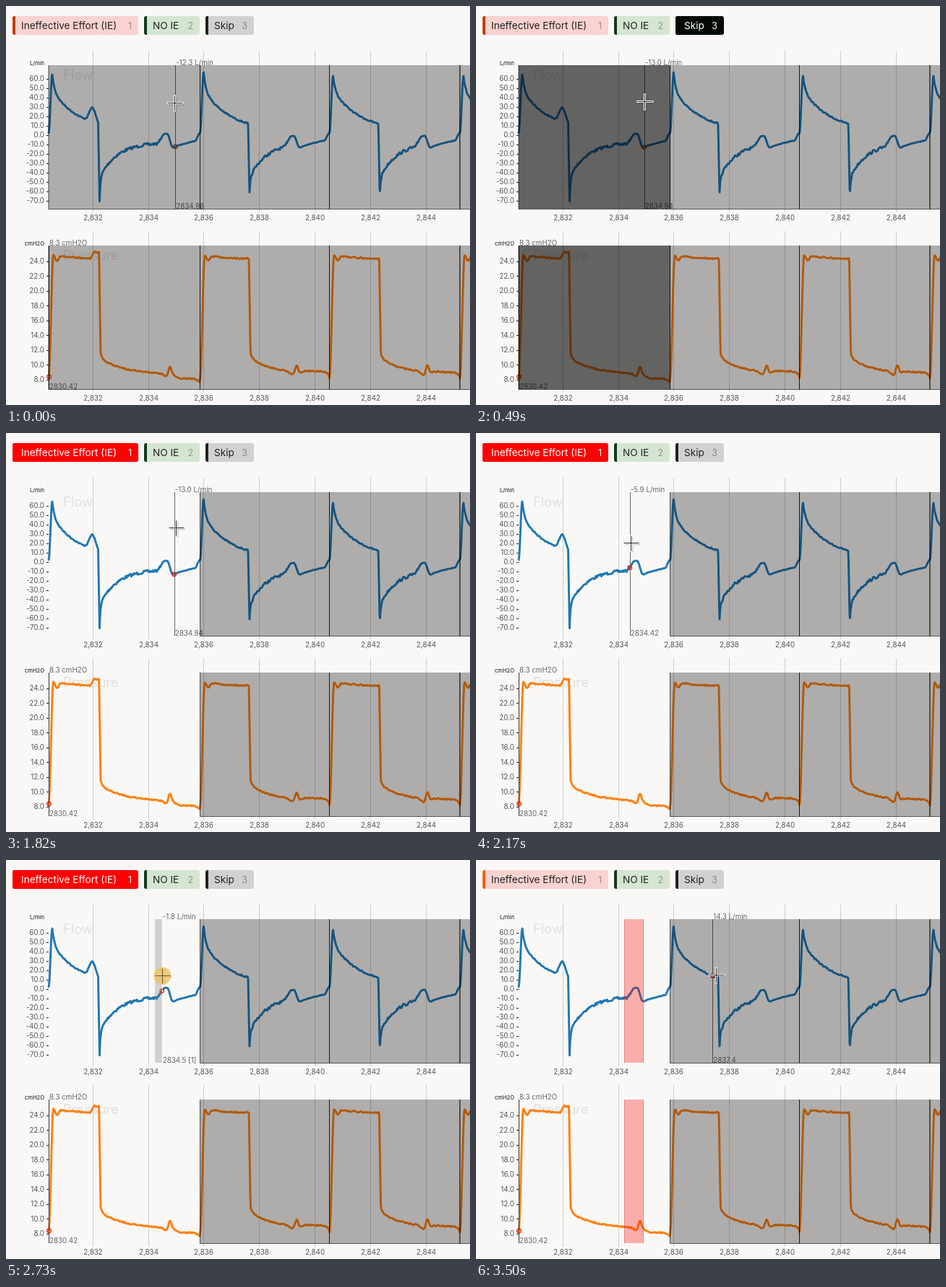
Recreate the animation shown at these times as an HTML page. Size 642 by 553 pixels, loop 3.57 s.

```html
<!DOCTYPE html>
<html lang="en">
<head>
<meta charset="utf-8">
<title>Waveform annotation</title>
<style>
  html, body { margin: 0; width: 100%; height: 100%; overflow: hidden; background: #f9f8f6; }
  svg { display: block; width: 642px; height: 553px; }
  text { font-family: Inter, "Open Sans", sans-serif; font-size: 9.8px; fill: #555; white-space: pre; }
  .title { font-size: 18.4px; fill: #e1e0df; }
  .unit { font-size: 7.6px; fill: #111; }
  .readout { fill: #666; }
  .name { font-size: 13.6px; fill: #222; }
  .key { font-size: 12.5px; fill: #222; fill-opacity: .4; }
  .pressed text { fill: #fff; fill-opacity: 1; }
  .wave { fill: none; stroke-width: 2.9; stroke-linejoin: round; stroke-linecap: round; }
</style>
</head>
<body>
<svg id="stage" viewBox="0 0 642 553"></svg>
<script>
const LOOP = 3570, STEP = 70, WIDTH = 642;
const stage = document.getElementById('stage');
const plots = [{ top: 82, bottom: 281 }, { top: 332, bottom: 531 }];
const timeToX = s => 59 + (s - 2830.42) * 38.43;

const mix = (a, b, p) => a + (b - a) * p;
const clamp = p => Math.min(1, Math.max(0, p));
const ease = p => p * p * (3 - 2 * p);
const smooth = (from, to, x) => ease(clamp((x - from) / (to - from)));
const decay = (d, length) => Math.exp(-d / length);
const bell = (d, width) => Math.exp(-d * d / (2 * width * width));

function set(el, attrs) {
  for (const k in attrs) el.setAttribute(k, attrs[k]);
}
function add(parent, tag, attrs, text) {
  const el = document.createElementNS('http://www.w3.org/2000/svg', tag);
  set(el, attrs);
  if (text !== undefined) el.textContent = text;
  return parent.appendChild(el);
}
const show = (el, on) => el.style.display = on ? '' : 'none';
const group = () => add(stage, 'g', {});
const label = (x, y, cls, text, anchor = 'start', parent = stage) =>
  add(parent, 'text', { x, y, class: cls, 'text-anchor': anchor }, text);
const line = (d, stroke, width = 1, parent = stage) =>
  add(parent, 'path', { d, stroke, 'stroke-width': width, fill: 'none' });

// Breaths: x of the start, the switch to exhaling, the late effort and the end;
// flow extremes; late pressure drift; strength of a push before exhaling.
const breath = (start, drop, effort, end, peak, trough, sag, push) =>
  ({ start, drop, effort, end, peak, trough, sag, push });
const breaths = [
  breath(59, 127.5, 226.8, 268.5, 95, 271, 6, 20),
  breath(268.5, 334.9, 402, 447.5, 92, 262, -3, 0),
  breath(447.5, 515.2, 583, 628, 97, 263, -2, 0),
  breath(628, 696, 764, 808, 97, 263, -2, 0)
];
const breathAt = x => breaths.find(b => x < b.end);

function inhaleFlow(b, x) {
  const d = x - b.start - 5;
  return 174.2 - 57.3 * decay(d, 38) - (116.9 - b.peak) * decay(d, 3)
    - b.push * bell(x - b.drop + 8, 4.2);
}
function exhaleFlow(b, x) {
  const d = x - b.drop - 2, e = x - b.effort;
  const early = 189 + 49 * decay(d, 24) + (b.trough - 238) * decay(d, 1.2) - 13 * smooth(-18, -7, e);
  const late = 195.87 - .7 * Math.max(0, e - 6) ** .75;
  return mix(mix(early, late, smooth(-4, 4, e)), 176, smooth(b.end - 7, b.end, x));
}
function flowY(x) {
  const b = breathAt(x);
  if (x < b.start + 5) return mix(176, b.peak, smooth(b.start, b.start + 5, x));
  if (x < b.drop) return inhaleFlow(b, x);
  if (x < b.drop + 2) return mix(inhaleFlow(b, b.drop), b.trough, (x - b.drop) / 2);
  return exhaleFlow(b, x);
}

function pressureY(x) {
  const b = breathAt(x), d = x - b.start, fall = b.drop + 1.2;
  const held = 344.5 + 7 * (1 - decay(d, 40)) + 7 * bell(d - 11.5, 2)
    - .45 * b.push * smooth(fall - 13, fall - 6, x);
  if (x < fall) return mix(516, held, smooth(0, 6.5, d));
  const out = Math.max(0, x - fall - 2), e = x - b.effort;
  const released = 511 - 22 * decay(out, 35) - 8 * decay(out, 3) + 4 * bell(e + 5, 4)
    - 11 * bell(e, 2) + b.sag * smooth(2, 14, e) + 4 * smooth(b.end - 8, b.end, x);
  return mix(held, released, clamp((x - fall) / 2.2));
}

function wavePath(curve, roughness, seed) {
  const random = () => (seed = seed * 16807 % 2147483647) / 2147483647 - .5;
  const grain = Array.from({ length: WIDTH }, random);
  let d = '';
  for (let x = 59; x <= WIDTH + 2; x += .5) {
    const g = (x - 59) / 1.3, i = Math.floor(g);
    const y = curve(x) + mix(grain[i], grain[i + 1], g - i) * roughness(x);
    d += `${d ? 'L' : 'M'}${x},${y.toFixed(1)}`;
  }
  return d;
}
function flowRoughness(x) {
  const b = breathAt(x);
  if (x < b.start + 8 || x > b.effort - 14) return .6;
  return x < b.drop ? 2 : 4.2;
}

// Grid, axes and titles
for (let s = 2832; s < 2846; s += 2) {
  const x = Math.round(timeToX(s)) + .5;
  line(`M${x},62V286M${x},312V536`, '#cecdcc');
  const text = s.toLocaleString('en-US');
  label(x, 296.5, '', text, 'middle');
  label(x, 546.5, '', text, 'middle');
}
function axis(from, to, step, toY) {
  for (let v = from; v <= to; v += step) {
    const y = toY(v);
    label(53, y + 3.5, '', v.toFixed(1), 'end');
    line(`M56,${Math.round(y) + .5}h3`, '#222');
  }
}
axis(-70, 60, 10, v => 178.9 - v * 1.3);
axis(8, 24, 2, v => 517.8 - (v - 8) * 10.25);
label(53, 82, 'unit', 'L/min', 'end');
label(53, 332, 'unit', 'cmH2O', 'end');
label(79, 102, 'title', 'Flow');
label(79, 352, 'title', 'Pressure');

add(stage, 'path', { class: 'wave', stroke: '#1f77b4', d: wavePath(flowY, flowRoughness, 7) });
add(stage, 'path', { class: 'wave', stroke: '#ff7f0e', d: wavePath(pressureY, () => 1.8, 23) });

// Readouts
const hairline = line('', '#666');
const flowValue = label(0, 82, 'readout', '');
const flowTime = label(0, 281, 'readout', '');
line('M59.5,332V531', '#333');
label(60, 332, 'readout', '8.3 cmH2O');
label(60, 531, 'readout', '2830.42');
const ring = cy => add(stage, 'circle', { cx: 59.5, cy, r: 2.8, fill: 'none', 'stroke-width': 1.2 });
const flowRing = ring(195), pressureRing = ring(514);

// Overlays
function block(parent, x0, x1, plot, fill, opacity) {
  return add(parent, 'rect', { x: x0, y: plot.top, width: x1 - x0, height: plot.bottom - plot.top,
    fill, 'fill-opacity': opacity });
}
const shades = breaths.map(({ start, end }) => {
  const g = group();
  plots.forEach(p => {
    block(g, start, end, p, '#000', .3);
    line(`M${start},${p.top}V${p.bottom + .5}H${end}V${p.top}`, 'rgba(0,0,0,.65)', 1, g);
  });
  return g;
});
const dark = group();
plots.forEach(p => block(dark, 59, 268.5, p, '#000', .43));
const selection = block(stage, 206, 206, plots[0], '#808080', .33);
const annotation = group();
plots.forEach(p => {
  block(annotation, 205.5, 231.5, p, '#f00', .3);
  line(`M205.5,${p.top}V${p.bottom}M231.5,${p.top}V${p.bottom}`, 'rgba(190,40,40,.45)', 1, annotation);
});

// Buttons
function button(x, width, name, key, tint, color, active) {
  const g = group();
  const box = add(g, 'rect', { x, y: 14, width, height: 26, rx: 3 });
  const bar = add(g, 'path', { d: `M${x + 4},14h-1a3,3 0 0 0 -3,3v20a3,3 0 0 0 3,3h1z` });
  label(x + 12, 31.5, 'name', name, 'start', g);
  label(x + width - 9, 31.5, 'key', key, 'end', g);
  return (pressed, barColor = color) => {
    set(g, { class: pressed ? 'pressed' : '' });
    set(box, { fill: pressed ? active : tint });
    set(bar, { fill: pressed ? active : barColor });
  };
}
const effortButton = button(9, 174, 'Ineffective Effort (IE)', 1, '#fad2cf', '#f0600f', '#fb0303');
const noEffortButton = button(191, 77, 'NO IE', 2, '#d4e5d2', '#12381f', '#12381f');
const skipButton = button(276, 67, 'Skip', 3, '#d1d1cf', '#1e221f', '#020a03');
noEffortButton(false);

// Pointer
const pointer = group();
const cross = 'M-10,0H11M0,-10V11';
set(line(cross, 'rgba(0,0,0,.22)', 2.5, pointer), { transform: 'translate(1.5 1.5)' });
line('M-11,0H12M0,-11V12', '#fff', 3, pointer);
const click = add(pointer, 'circle', { r: 12, fill: '#f3c05a', 'fill-opacity': .8 });
const core = line(cross, '#222', 1, pointer);

// Poses: seconds on the time axis, pointer x, pointer y
const START = [2834.98, 233, 134], REST = [2834.94, 233, 132], NUDGED = [2834.94, 235, 131];
const PRESS = [2834.24, 206, 160], RELEASE = [2834.9, 231, 160], LEAVE = [2837.4, 332, 159];
const between = (a, b, p) => a.map((v, i) => mix(v, b[i], p));
const stepped = (ms, from, count) => ease(clamp((Math.floor((ms - from) / STEP) + 1) / count));

function poseAt(ms) {
  if (ms < 70) return START;
  if (ms < 980) return REST;
  if (ms < 2520) return between(NUDGED, PRESS, stepped(ms, 1960, 6));
  if (ms < 3220) return between(PRESS, RELEASE, stepped(ms, 2590, 7));
  return between(RELEASE, LEAVE, stepped(ms, 3290, 4));
}

function draw() {
  const ms = performance.now() % LOOP;
  const [seconds, px, py] = poseAt(ms);
  const x = timeToX(seconds), y = flowY(x);
  const dragging = ms >= 2590 && ms < 3220;
  const clicking = ms >= 2520 && ms < 3010;
  const effort = ms >= 1820 && ms < 3220;
  const skip = ms >= 490 && ms < 980;
  const accent = ms < 980 ? '#c23c0a' : '#f0600f';
  const ringColor = effort || ms >= 3220 ? '#f01505' : accent;

  set(hairline, { d: `M${Math.round(x) + .5},82V281`, stroke: dragging ? '#fff' : '#666' });
  set(flowValue, { x: x + 1 });
  set(flowTime, { x: x + 1 });
  flowValue.textContent = ((178.9 - y) / 1.305).toFixed(1) + ' L/min';
  flowTime.textContent = +seconds.toFixed(2) + (dragging ? ' [1]' : '');
  set(flowRing, { cx: x, cy: y, stroke: ringColor });
  set(pressureRing, { stroke: ringColor });

  show(shades[0], ms < 980);
  show(dark, skip);
  show(selection, dragging);
  set(selection, { width: Math.max(0, x - 206) });
  show(annotation, ms >= 3220);
  effortButton(effort, accent);
  skipButton(skip);

  show(click, clicking);
  set(core, { 'stroke-opacity': clicking ? .7 : 1 });
  set(pointer, { transform: `translate(${Math.round(px) + .5} ${Math.round(py) + .5})` });
  requestAnimationFrame(draw);
}
draw();
</script>
</body>
</html>
```
